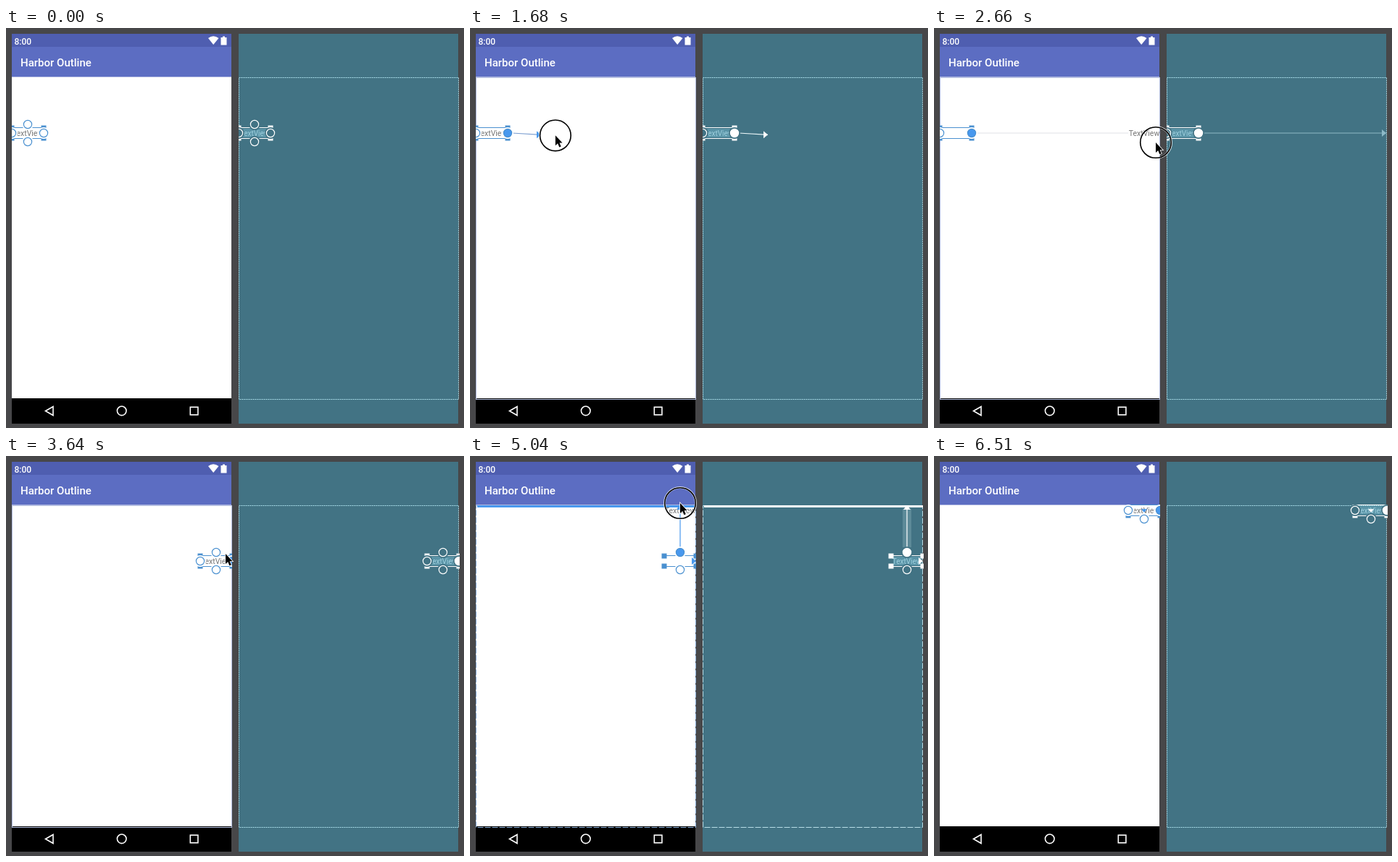
An HTML page that plays this animation: 632x552 px, repeating every 6580 ms.

```html
<!DOCTYPE html>
<html lang="en">
<head>
<meta charset="utf-8">
<title>Layout editor</title>
<style>
  html, body { margin: 0; width: 100%; height: 100%; overflow: hidden; background: #474749; }
  svg { display: block; width: 632px; height: 552px; font-family: Roboto, sans-serif; }
</style>
</head>
<body>
<svg viewBox="0 0 632 552">
  <defs>
    <clipPath id="canvasClip"><rect x="8" y="67" width="304" height="446"/></clipPath>
    <clipPath id="blueprintClip"><rect x="8" y="67" width="305" height="446"/></clipPath>
  </defs>
  <rect width="632" height="552" fill="#474749"/>
  <rect x="8" y="8" width="303" height="18.5" fill="#4f5eb0"/>
  <rect x="8" y="26" width="303" height="42" fill="#5c6dc2"/>
  <rect x="8" y="67.5" width="303" height="443.5" fill="#fff"/>
  <rect x="8" y="511" width="303" height="35" fill="#000"/>
  <rect x="321" y="8" width="303" height="538" fill="#427384"/>
  <g fill="#fff" font-weight="500">
    <text x="11.5" y="23" font-size="12">8:00</text>
    <text x="20" y="53" font-size="15">Harbor Outline</text>
    <path d="M279 14Q286 8.500 293.500 14L286.200 23Z"/>
    <path d="M299 11.500h3v1.500h2.500v10.500h-8V13h2.500Z"/>
  </g>
  <g fill="none" stroke="#fff" stroke-width="1.6">
    <path d="M54.500 528.500L65 522.500V534.500Z"/>
    <circle cx="159.700" cy="528.300" r="6.300"/>
    <rect x="254.300" y="523.200" width="10.600" height="10.600"/>
  </g>
  <g id="scene"></g>
</svg>
<script>
const LOOP = 6580, STEP = 70, PANEL_GAP = 313;
const PRESS1 = 1260, SNAP1 = 2450, DROP1 = 2940;
const PRESS2 = 4200, SNAP2 = 4830, DROP2 = 5320;
const SHOW = 560, HIDE = 6160;

const design = {
  line: '#4a90d0', soft: '#7d9fd0', fill: '#4898ee', bg: '#fff', text: '#757575',
  faint: '#dfe2e8', dash: '#8fb3dd', clip: 'canvasClip'
};
const blueprint = {
  line: '#fff', soft: '#e8f4f6', fill: '#fff', bg: '#427384', text: '#9fd0de',
  faint: '#8dbac8', dash: '#b7dde6', clip: 'blueprintClip', box: '#5a94a7'
};

// Cursor tip: time, x, y
const cursorPath = [
  [SHOW, 175, 235], [980, 74, 150], [1190, 52, 145], [1330, 52, 145],
  [2380, 306, 158], [3220, 306, 158], [3640, 303, 135], [3990, 290, 133],
  [4340, 290, 133], [4900, 290, 65], [5600, 290, 65], [HIDE, 215, 190]
];

const smooth = u => u * u * (3 - 2 * u);

function cursorAt(t) {
  const i = cursorPath.findIndex(key => key[0] > t);
  if (i === 0) return cursorPath[0].slice(1);
  if (i < 0) return cursorPath[cursorPath.length - 1].slice(1);
  const [t0, x0, y0] = cursorPath[i - 1], [t1, x1, y1] = cursorPath[i];
  const s = smooth((t - t0) / (t1 - t0));
  return [x0 + (x1 - x0) * s, y0 + (y1 - y0) * s];
}

const rect = (x, y, w, h, fill, more = '') =>
  `<rect x="${x}" y="${y}" width="${w}" height="${h}" fill="${fill}" ${more}/>`;
const segment = (x1, y1, x2, y2, color, width = 1.2) =>
  `<path d="M${x1} ${y1}L${x2} ${y2}" stroke="${color}" stroke-width="${width}"/>`;
const arrowHead = (x, y, angle, color, size = 5) =>
  `<path d="M0 0L${-size * 1.2} ${-size}V${size}Z" fill="${color}" transform="translate(${x} ${y}) rotate(${angle})"/>`;
const label = (x, y, color, size) =>
  `<text x="${x}" y="${y}" font-size="${size}" text-anchor="middle" fill="${color}">TextView</text>`;

function handle(x, y, filled, c) {
  return `<circle cx="${x}" cy="${y}" r="8" fill="${c.bg}"/>` +
    `<circle cx="${x}" cy="${y}" r="5.600" fill="${filled ? c.fill : c.bg}" stroke="${c.line}" stroke-width="1.200"/>`;
}

function widget(s, c) {
  const { x, y, drag } = s, right = x + 44, mid = x + 22;
  let out = '';
  if (c.box) out += rect(x + 3, y - 6, 38, 12, c.box);
  if (c.box || !s.snapped) out += label(mid, y + 4, c.text, c.box ? 10 : 10.5);
  out += segment(x, y - 7.5, right, y - 7.5, c.line) + segment(x, y + 7.5, right, y + 7.5, c.line);
  for (const cx of [x, right])
    for (const cy of [y - 7, y + 7]) out += rect(cx - 3.5, cy - 3.5, 7, 7, c.line);

  if (drag !== 'up') {
    out += handle(x, y, false, c) + handle(right, y, drag === 'right' || s.pinnedRight, c);
  } else {
    out += arrowHead(right, y, 0, c.fill);
  }
  if (drag !== 'right') {
    if (!s.pinnedTop) out += handle(mid, y - 12, drag === 'up', c);
    else out += arrowHead(mid, y + 3, 90, c.fill, 4);
    out += handle(mid, y + 12, false, c);
  }
  return out;
}

function connector(s, c) {
  const { x, y, drag, tip } = s;
  if (drag === 'right') {
    if (s.snapped) {
      const end = c.box ? 311 : 268;
      return segment(x + 50, y, end, y, c.faint) + (c.box ? arrowHead(311, y, 0, c.faint) : label(290, y + 4, c.text, 10.5));
    }
    if (tip[0] < x + 52) return '';
    return segment(x + 50, y, tip[0], tip[1], c.soft) + arrowHead(tip[0], tip[1], 0, c.fill);
  }
  if (drag === 'up') {
    const mid = x + 22, end = s.snapped ? 68 : tip[1];
    if (end > y - 20) return '';
    let out = '';
    if (s.snapped && c.box) out += rect(mid - 6, 73, 12, 53, '#5d8a98');
    if (s.snapped && !c.box) out += label(mid, 79, c.text, 10.5);
    return out + segment(mid, y - 18, mid, end, c.fill) + arrowHead(mid, end, -90, c.fill);
  }
  return '';
}

function outline(s, c) {
  const targeted = s.drag === 'up' && s.snapped;
  if (!c.box && !s.hover) return '';
  const color = targeted ? c.dash : c.box ? '#a9dce8' : '#b4bfe0';
  const dash = targeted ? '8 2' : c.box ? '2 1' : 'none';
  return rect(8.5, 68.5, 303, 444, 'none', `stroke="${color}" stroke-dasharray="${dash}"`) +
    (targeted ? rect(10, 68, 302, 3, c.fill) : '');
}

function panel(s, c, dx) {
  return `<g transform="translate(${dx})">${outline(s, c)}` +
    `<g clip-path="url(#${c.clip})">${connector(s, c)}${widget(s, c)}</g></g>`;
}

function pointer(t) {
  if (t < SHOW || t >= HIDE) return '';
  const [x, y] = cursorAt(t);
  const pressed = (t >= PRESS1 && t < DROP1) || (t >= PRESS2 && t < DROP2);
  const ring = pressed
    ? `<g fill="none"><circle r="21.500" stroke="#fff" stroke-width="3" stroke-opacity=".8"/>` +
      `<circle r="21.300" stroke="#000" stroke-width="1.600"/></g>`
    : '';
  return `<g transform="translate(${x} ${y})">${ring}` +
    `<path d="M0 0V14L3.200 11L5.400 16.200L7.800 15.200L5.600 10.200H9.600Z" stroke="#fff" paint-order="stroke" stroke-width="1.500"/></g>`;
}

function stateAt(t) {
  const drag = t >= PRESS1 && t < DROP1 ? 'right' : t >= PRESS2 && t < DROP2 ? 'up' : '';
  const pinnedRight = t >= DROP1, pinnedTop = t >= DROP2;
  return {
    drag, pinnedRight, pinnedTop,
    x: pinnedRight ? 268 : 8,
    y: pinnedTop ? 75 : 145,
    snapped: (drag === 'right' && t >= SNAP1) || (drag === 'up' && t >= SNAP2),
    hover: t >= SHOW && t < HIDE,
    tip: cursorAt(t - 65)
  };
}

const scene = document.getElementById('scene');
let shown = -1;

function draw(now) {
  const t = Math.floor((now % LOOP) / STEP) * STEP;
  if (t !== shown) {
    const s = stateAt(t);
    scene.innerHTML = panel(s, design, 0) + panel(s, blueprint, PANEL_GAP) + pointer(t);
    shown = t;
  }
  requestAnimationFrame(() => draw(performance.now() - start));
}

const start = performance.now();
draw(0);
</script>
</body>
</html>
```
